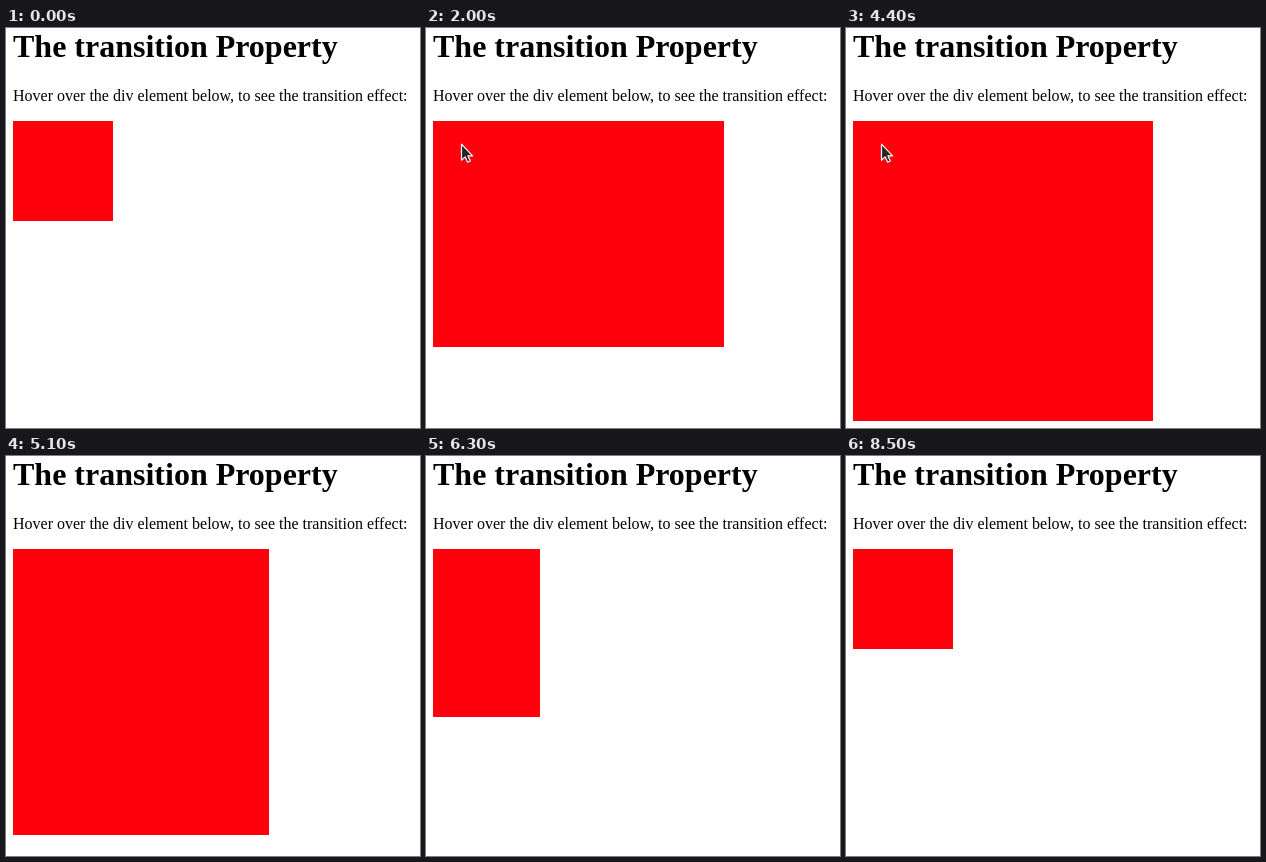
Write an HTML page that moves like this. It is 414 by 400 pixels and loops after 9500 ms.

```html
<!DOCTYPE html>
<html lang="en">
<head>
<meta charset="utf-8">
<title>The transition Property</title>
<style>
  html, body { margin: 0; width: 100%; height: 100%; overflow: hidden; background: #fff; }
  body { position: relative; color: #000; font: 16px "Liberation Serif", serif; }
  h1, p, #box, #cursor { position: absolute; left: 7px; margin: 0; white-space: nowrap; }
  h1 { top: 0; font-size: 32px; font-weight: bold; }
  p { top: 59px; }
  #box { top: 93px; width: 100px; height: 100px; background: #ff000d; }
  #cursor { left: 34px; top: 114px; visibility: hidden; }
</style>
</head>
<body>
<h1>The transition Property</h1>
<p>Hover over the div element below, to see the transition effect:</p>
<div id="box"></div>
<svg id="cursor" width="15" height="22">
  <path d="M1.5 2.2V18.2L5.2 14.9L7.7 20.2L10.3 19L7.9 13.8H12.6Z"
        fill="#262626" stroke="#fff" stroke-width="1.2" stroke-linejoin="round"/>
</svg>
<script>
const LOOP = 9500, STEP = 100;
const CURSOR_IN = 500, CURSOR_OUT = 4700;
const GROW_START = 533.5, SHRINK_START = 4767;
const WIDTH_TIME = 2000, HEIGHT_TIME = 4000;
const box = document.getElementById("box");
const cursor = document.getElementById("cursor");

// CSS "ease": cubic-bezier(0.25, 0.1, 0.25, 1)
function ease(x) {
  if (x <= 0) return 0;
  if (x >= 1) return 1;
  let low = 0, high = 1;
  for (let i = 0; i < 30; i++) {
    const mid = (low + high) / 2;
    if (0.75 * mid * (1 - mid) + mid ** 3 < x) low = mid;
    else high = mid;
  }
  const rest = 1 - low;
  return 1 - 2.7 * rest ** 2 + 1.7 * rest ** 3;
}

function size(t, duration) {
  const grown = ease((t - GROW_START) / duration);
  const shrunk = ease((t - SHRINK_START) / duration);
  return 100 + 200 * (grown - shrunk);
}

function draw(now) {
  const t = Math.floor((now % LOOP) / STEP) * STEP;
  box.style.width = Math.round(size(t, WIDTH_TIME)) + "px";
  // The box top sits 1/8 px above the pixel grid.
  box.style.height = Math.round(size(t, HEIGHT_TIME) - 0.125) + "px";
  cursor.style.visibility = t >= CURSOR_IN && t < CURSOR_OUT ? "visible" : "hidden";
}

const start = performance.now();
function tick() {
  draw(performance.now() - start);
  requestAnimationFrame(tick);
}
tick();
</script>
</body>
</html>
```
